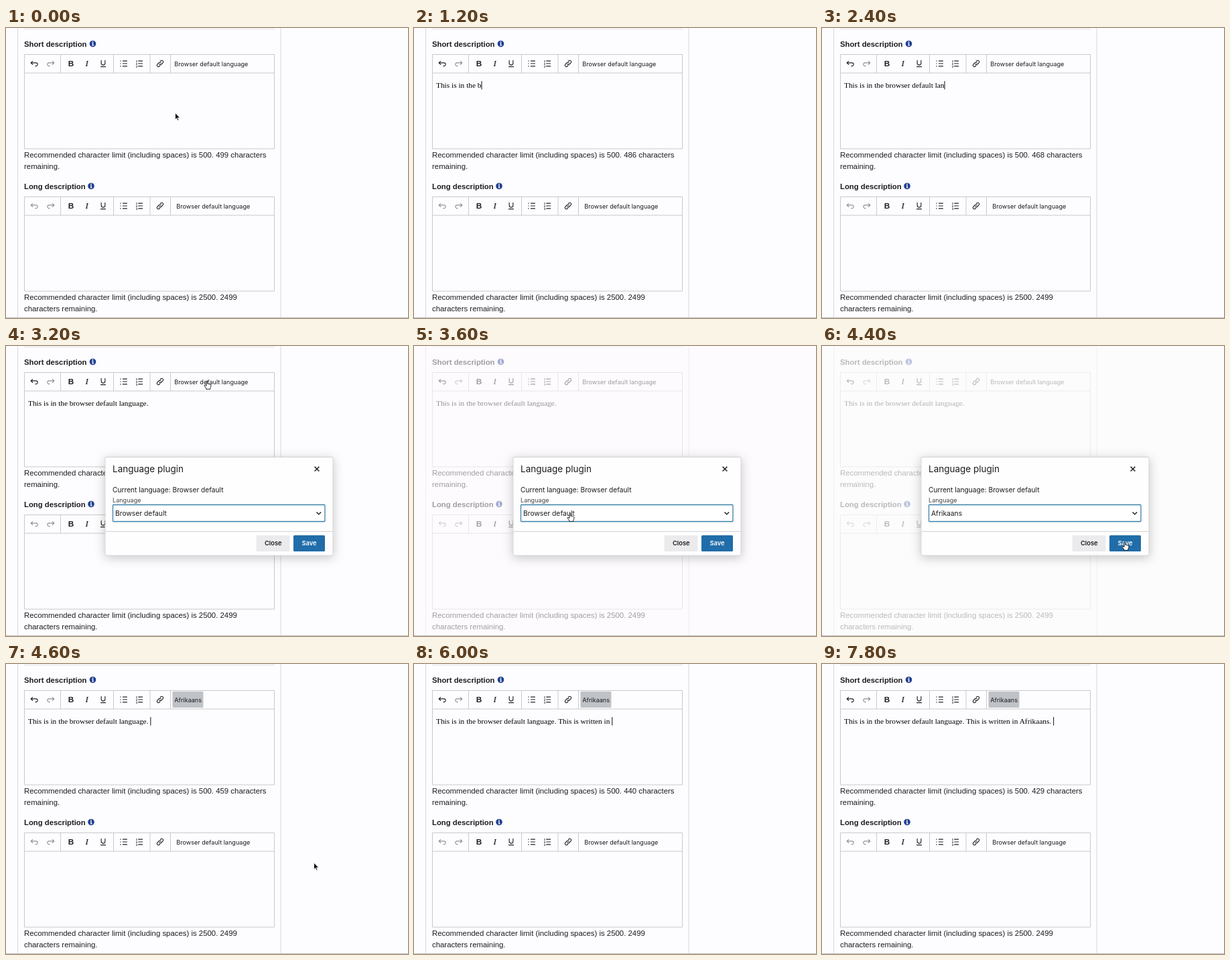
Animation, 600 px wide and 432 px high, one loop 8 s. Source, as an HTML page:

```html
<!DOCTYPE html>
<html lang="en">
<head>
<meta charset="utf-8">
<title>Language plugin</title>
<style>
  html, body { margin: 0; width: 100%; height: 100%; overflow: hidden; background: #fdfcfe; }
  svg { display: block; width: 600px; height: 432px; }
  text { white-space: pre; fill: #1c1c1e; }
  .body { font: 11.4px 'Liberation Sans', Arial, sans-serif; }
  .head { font: bold 11.3px 'Liberation Sans', Arial, sans-serif; }
  .serif { font: 11.36px 'Liberation Serif', Times, serif; fill: #000; }
  .ui { font-family: Inter, 'Noto Sans', 'DejaVu Sans', sans-serif; }
  .line { fill: none; stroke: #c9c9cb; }
  .icon { fill: none; stroke: #222; stroke-width: 1.6; stroke-linecap: round; stroke-linejoin: round; }
</style>
</head>
<body>
<svg id="stage" viewBox="0 0 600 432">
  <defs>
    <filter id="shadow" x="-20%" y="-30%" width="140%" height="170%">
      <feDropShadow dx="0" dy="3" stdDeviation="8" flood-color="#000" flood-opacity=".22"/>
    </filter>
    <linearGradient id="menuFill" x1="0" y1="0" x2="1" y2=".25">
      <stop offset=".7" stop-color="#efeff0"/>
      <stop offset="1" stop-color="#e9eef2"/>
    </linearGradient>
    <path id="undo" d="M6.8 5.2 3 8.5 6.8 11.8M3.2 8.5H14a3.3 3.3 0 0 1 0 6.6q-.7 0-1.3-.3"/>
    <path id="under" d="M6 3.5V9a4 4 0 0 0 8 0V3.5M5 16.5H15"/>
    <path id="bullets" d="M8.5 4.5H17M8.5 10H17M8.5 15.5H17M3.4 4.5H4M3.4 10H4M3.4 15.5H4"/>
    <path id="numbers" d="M8.5 4.5H17M8.5 10H17M8.5 15.5H17"/>
    <path id="link" d="M8.6 11.4a3 3 0 0 0 4.2 0l3.2-3.2a3 3 0 0 0-4.2-4.2L10.4 5.400M11.4 8.600a3 3 0 0 0-4.200 0l-3.200 3.200a3 3 0 0 0 4.200 4.200l1.400-1.400"/>
  </defs>
  <rect width="600" height="432" fill="#fdfcfe"/>
  <g id="page"></g>
  <rect id="veil" width="600" height="431" fill="#fdfcfe"/>
  <path d="M0 431.500H600" stroke="#bdbdc0"/>
  <g id="dialog" class="ui"></g>
  <g id="menu" class="ui"></g>
  <path id="arrow" d="M0 0V10L2.300 7.900 3.900 11.400 5.500 10.700 4 7.300H7.200Z" fill="#111" stroke="#fff" stroke-width=".8"/>
  <path id="hand" d="M-.9 1q0-1 .9-1t.9 1V4.300q1.600-.6 1.900.5 1.400-.4 1.700.6 1.500-.2 1.500 1.100 0 2.600-1.200 4V12.300H-1.200V11L-4 7.400q-.3-1.300 1-1.200L-.9 7.500Z" fill="#fff" stroke="#111" stroke-width=".9" stroke-linejoin="round"/>
</svg>
<script>
const LOOP = 8000;
const TEXT = 'This is in the browser default language. This is written in Afrikaans. ';
const LANGS = ['Browser default', 'аҧсуа', 'Afaraf', 'Afrikaans', 'Akan', 'Shqip', 'አማርኛ',
  'العربية', 'Aragonés', 'Հայերեն', 'অসমীয়া', 'авар мацӀ, магӀарул мацӀ'];
const ROW = 15.56;

// [time, value] tracks
const TYPED = [[133, 0], [2800, 40], [2900, 41], [4900, 41], [5850, 60], [6150, 60], [7000, 70], [7400, 70], [7450, 71]];
const MOUSE_X = [[0, 252.5], [2950, 252.5], [3180, 300], [3280, 300], [3550, 233], [3720, 233], [3950, 228.5],
  [4150, 228.5], [4380, 452], [4480, 452], [4600, 459.5]];
const MOUSE_Y = [[0, 126.5], [2950, 126.5], [3180, 52], [3280, 52], [3550, 249], [3720, 249], [3950, 290],
  [4150, 290], [4380, 292], [4480, 292], [4600, 296]];
const FADE = [[3200, 0], [3500, 0.5], [3600, 0.58], [3900, 0.7]];

const OPEN = 3200, MENU = 3700, PICK = 4180, SAVE = 4480;

const $ = id => document.getElementById(id);
const text = (x, y, s, cls, extra = '') => `<text x="${x}" y="${y}" class="${cls}" ${extra}>${s}</text>`;
const icon = (id, cx, cy, color = '#222') =>
  `<use href="#${id}" class="icon" style="stroke:${color}" transform="translate(${cx - 7.1} ${cy - 7.1}) scale(.71)"/>`;
const within = (t, a, b) => t >= a && t < b;
const show = (el, on) => el.setAttribute('visibility', on ? 'visible' : 'hidden');

function track(keys, t) {
  if (t <= keys[0][0]) return keys[0][1];
  for (let i = 1; i < keys.length; i++) {
    const [t0, a] = keys[i - 1], [t1, b] = keys[i];
    if (t <= t1) return a + (b - a) * (t - t0) / (t1 - t0);
  }
  return keys[keys.length - 1][1];
}

function editor(y, title, infoX, undoColor, label, notes) {
  const cy = y + 53;
  const digits = [1, 2, 3].map(n =>
    text(193.8, y + 46.9 + n * 3.9, n, 'body', 'style="font-size:4.2px;font-weight:bold"')).join('');
  return text(27, y + 27.5, title, 'head') +
    `<circle cx="${infoX}" cy="${y + 23.5}" r="4.8" fill="#203f91"/>
     <path d="M${infoX - 1.3} ${y + 22.8}h1.500v3.200m-1.700 0h3.300" fill="none" stroke="#fff" stroke-width="1.200"/>
     <circle cx="${infoX}" cy="${y + 20.7}" r=".9" fill="#fff"/>
     <path class="line" d="M27.500 ${y + 39.500}H400.500V${y + 180}H27.500ZM27.500 ${y + 67}H400.500M81.500 ${y + 40}v27M160.500 ${y + 40}v27M215 ${y + 40}v27M245.500 ${y + 40}v27"/>` +
    icon('undo', 42, cy, undoColor) +
    `<g transform="translate(109 0) scale(-1 1)">${icon('undo', 42, cy, '#929295')}</g>` +
    text(92.8, y + 57.1, 'B', 'head', 'style="font-size:11.8px"') +
    text(118.6, y + 57.2, 'I', 'serif', 'style="font-size:13px;font-style:italic"') +
    icon('under', 145, cy) + icon('bullets', 175.5, cy) + icon('numbers', 198.7, cy) + digits +
    icon('link', 230, cy) + label +
    text(27, y + 193.2, notes[0], 'body') + text(27, y + 210.2, notes[1], 'body');
}

function build() {
  const limit = 'Recommended character limit (including spaces) is ';
  const label = 'style="font-size:9.1px"';
  $('page').innerHTML =
    `<path d="M17.500 0V431M410 0V431" stroke="#d9d9dc"/><path d="M27 1.500H401" stroke="#e3e3e6"/>` +
    editor(0, 'Short description', 129.5, '#222',
      `<rect id="chip" x="248.500" y="41" width="46" height="24" rx="1.500" fill="#bfc2c6"/>` +
      text(251.3, 56.5, '', 'ui', `id="lang" ${label}`),
      [`${limit}500. <tspan id="left"></tspan> characters`, 'remaining.']) +
    editor(212, 'Long description', 127, '#929295',
      text(254.2, 268.5, 'Browser default language', 'ui', label),
      [`${limit}2500. 2499`, 'characters remaining.']) +
    text(33, 88.5, '', 'serif', 'id="typed"') +
    `<rect id="caret" y="79" width="1" height="12.500" fill="#111"/>`;

  $('dialog').innerHTML =
    `<rect x="148" y="165.500" width="340" height="146.500" rx="1" fill="#fefefe" stroke="#c8c8cb" stroke-width=".8" filter="url(#shadow)"/>
     <path d="M148.500 276.300H487.500" stroke="#cfcfd2"/>
     <path d="M460.600 179.700l6.800 6.800m0-6.800l-6.800 6.800" stroke="#222" stroke-width="1.600"/>
     <rect x="159.500" y="236.500" width="316.500" height="25" rx="1" fill="#fff" stroke="#3b82a8" stroke-width="1.300"/>
     <path d="M463.500 247.500l3.300 3.300 3.300-3.300" fill="none" stroke="#222" stroke-width="1.500"/>
     <rect x="373.500" y="282" width="50" height="24" rx="1.500" fill="#ebebed"/>
     <rect x="429" y="282" width="47" height="24" rx="1.500" fill="#206da9"/>` +
    text(159, 188, 'Language plugin', '', 'style="font-size:13.500px"') +
    text(159, 217.5, 'Current language: Browser default', '', 'style="font-size:10.200px"') +
    text(159, 233, 'Language', '', 'style="font-size:9.100px;fill:#444"') +
    text(163, 252.7, '', '', 'id="choice" style="font-size:10.300px"') +
    text(398.8, 297.4, 'Close', '', 'text-anchor="middle" style="font-size:9.300px;font-weight:600"') +
    text(452.5, 297.4, 'Save', '', 'text-anchor="middle" style="font-size:9.300px;font-weight:600;fill:#fff"');

  $('menu').innerHTML =
    `<path d="M152 432V241q0-4 4-4H465q4 0 4 4V432Z" fill="url(#menuFill)" stroke="#bcbcbe" stroke-width=".7"/>
     <rect id="hover" x="152" width="317" height="15.300" fill="#417ff0"/>
     <path d="M157 248.800l2 2.800 3.400-6" fill="none" stroke="#222" stroke-width="1.200"/>` +
    LANGS.map((s, i) => text(167, (252.2 + i * ROW).toFixed(1), s, 'row', 'style="font-size:10.500px"')).join('');
}

function draw(t) {
  const count = at => Math.floor(track(TYPED, at) + 0.01);
  const n = count(t), modal = within(t, OPEN, SAVE), saved = t >= SAVE;

  $('typed').textContent = TEXT.slice(0, n);
  $('left').textContent = 500 - Math.max(1, count(t - 130));
  $('caret').setAttribute('x', 33 + (n ? $('typed').getComputedTextLength() : 0));
  show($('caret'), n > 0 && !modal);

  $('lang').textContent = saved ? 'Afrikaans' : 'Browser default language';
  show($('chip'), saved);
  $('veil').setAttribute('opacity', modal ? track(FADE, t) : 0);

  show($('dialog'), modal);
  $('choice').textContent = t < PICK ? LANGS[0] : LANGS[3];
  const x = track(MOUSE_X, t), y = track(MOUSE_Y, t);
  const row = Math.max(0, Math.min(LANGS.length - 1, Math.floor((y - 241) / ROW)));
  show($('menu'), within(t, MENU, PICK));
  $('hover').setAttribute('y', 241.4 + row * ROW);
  document.querySelectorAll('.row').forEach((el, i) => { el.style.fill = i === row ? '#fff' : '#1c1c1e'; });

  const hand = within(t, 3120, SAVE);
  const moving = t < 150 || within(t, 2950, 4900);
  show($('arrow'), moving && !hand);
  show($('hand'), hand);
  for (const id of ['arrow', 'hand']) $(id).setAttribute('transform', `translate(${x} ${y})`);
}

build();
const start = performance.now();
function tick() {
  draw((performance.now() - start) % LOOP);
  requestAnimationFrame(tick);
}
draw(0);
requestAnimationFrame(tick);
</script>
</body>
</html>
```
